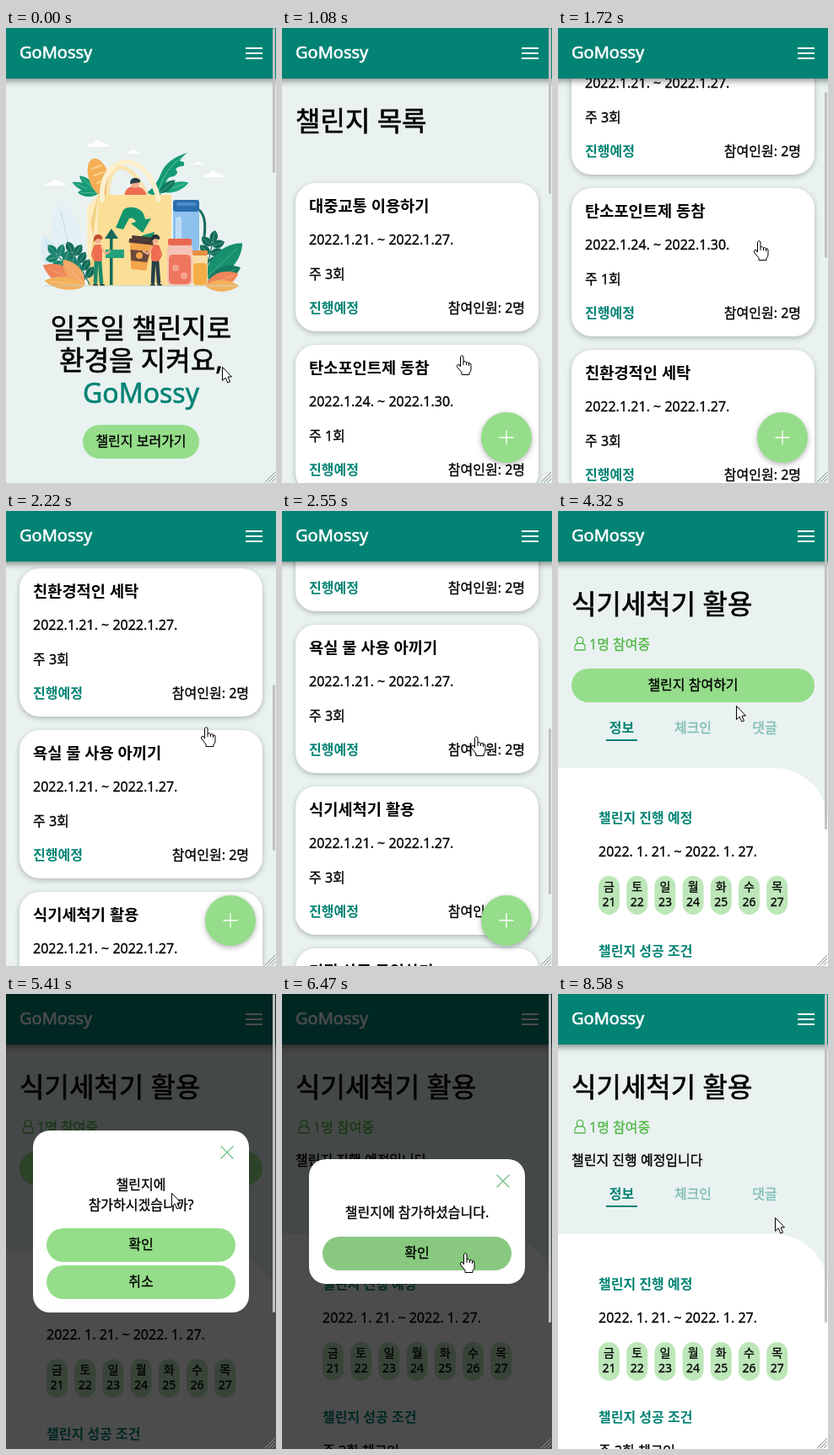
An HTML page for the animation above (8.61 s loop, 320 by 540 pixels).

```html
<!DOCTYPE html>
<html lang="ko">
<head>
<meta charset="utf-8">
<style>
html, body { margin: 0; height: 100%; overflow: hidden; background: #e9f2f1; }
svg { display: block; width: 320px; height: 540px; }
text {
  font-family: "Noto Sans", "Noto Sans CJK KR", "Noto Sans CJK", sans-serif;
  font-size: 16px; white-space: pre; fill: currentColor; stroke: currentColor; stroke-width: .02em;
}
.mid { text-anchor: middle; }
.end { text-anchor: end; }
.big { font-size: 32px; }
.small { font-size: 14px; }
.head { font-size: 18.72px; font-weight: 700; stroke: none; }
.brand { font-size: 20px; color: #fff; stroke-width: .03em; }
.bold { font-weight: 700; stroke: none; }
.teal { color: #028374; fill: #028374; }
.pale { color: #7dbcb4; }
.leafy { color: #55b848; }
.card { fill: #fff; filter: drop-shadow(0 2px 3px rgba(0, 0, 0, .25)); }
.bar { fill: #028374; filter: drop-shadow(0 2px 4px rgba(0, 0, 0, .5)); }
.button { fill: #95dd8a; }
.hover .button { fill: #88c97f; }
.fab { fill: #95dd8a; filter: drop-shadow(0 2px 3px rgba(0, 0, 0, .3)); }
.line { fill: none; stroke-linecap: round; stroke-linejoin: round; }
</style>
</head>
<body>
<svg id="stage" viewBox="0 0 320 540"></svg>
<script>
const LOOP = 8610;
const stage = document.getElementById('stage');

const text = (x, y, s, cls = '') => `<text x="${x}" y="${y}" class="${cls}">${s}</text>`;
const rect = (x, y, w, h, r, attrs) => `<rect x="${x}" y="${y}" width="${w}" height="${h}" rx="${r}" ${attrs}/>`;
const path = (d, fill) => `<path d="${d}" fill="${fill}"/>`;
const line = (d, color, width = 1) => `<path class="line" d="${d}" stroke="${color}" stroke-width="${width}"/>`;
const circle = (x, y, r, fill) => `<circle cx="${x}" cy="${y}" r="${r}" fill="${fill}"/>`;
const group = (id, body) => `<g id="${id}">${body}</g>`;
const button = (id, x, y, w, label) =>
  group(id, rect(x, y, w, 40, 20, 'class="button"') + text(x + w / 2, y + 25, label, 'mid'));

// A pointed leaf growing from (x, y), turned clockwise from upright
const leaf = (x, y, len, wide, turn, fill, vein = '#ffffff55') =>
  `<g transform="translate(${x} ${y}) rotate(${turn})">` +
  path(`M0 0C${-wide} ${-len * .3} ${-wide * .8} ${-len * .75} 0 ${-len}C${wide * .8} ${-len * .75} ${wide} ${-len * .3} 0 0`, fill) +
  line(`M0 0V${-len * .85}`, vein, .8) + '</g>';

const cloud = (x, y, w) => path(`M${x} ${y}q${w * .1} ${-w * .2} ${w * .28} ${-w * .14}q${w * .16} ${-w * .3} ${w * .38} ${-w * .04}q${w * .2} 0 ${w * .34} ${w * .18}z`, '#fff');

function sprig(x, y, turn, fill) {
  let s = line('M0 0V-48', fill, 1.2) + leaf(0, -42, 15, 7, 0, fill);
  for (let i = 0; i < 4; i++) s += leaf(0, -8 - i * 10, 16, 7, 60, fill) + leaf(0, -8 - i * 10, 16, 7, -60, fill);
  return `<g transform="translate(${x} ${y}) rotate(${turn})">${s}</g>`;
}

// A small figure, its near arm reaching towards side (1 right, -1 left)
function person(x, y, side, shirt, pants, hair) {
  return line(`M${x - 2} ${y + 30}L${x - 3} ${y + 56}M${x + 2} ${y + 30}L${x + 4} ${y + 56}`, pants, 4.5) +
    rect(x - 5, y + 11, 10, 20, 3.5, `fill="${shirt}"`) +
    line(`M${x + side * 4} ${y + 14}l${side * 5} 8 ${side * 5}-3`, '#f3b08f', 2.2) +
    line(`M${x - side * 4} ${y + 14}l${-side * 3} 9 ${side * 3} 6`, shirt, 2.4) +
    circle(x, y + 6, 3.8, '#f3b08f') + path(`M${x - 5} ${y + 8}q-1-10 6-9q5 1 4 6l-6-1z`, hair) +
    line(`M${x - 5} ${y + 59}h4M${x + 3} ${y + 59}h4`, '#24343c', 1.8);
}

const art = () =>
  cloud(96, 141, 27) + cloud(143, 149, 16) + cloud(46, 187, 25) + cloud(222, 162, 12) + cloud(234, 177, 25) +
  leaf(84, 300, 98, 26, -13, '#e3f0f6', '#bcd6e5') + leaf(64, 300, 58, 16, -20, '#dcecf5', '#bcd6e5') +
  [[-68, 34], [-48, 31], [-88, 25]].map(([a, l]) => leaf(110, 196, l, 7, a, '#169b76')).join('') +
  `<ellipse cx="110" cy="177" rx="12" ry="23" fill="#f4ae55" transform="rotate(-17 110 177)"/>` +
  line('M102 167l11-4M104 175l12-4M108 184l11-4', '#fbd08d', 2) +
  path('M166 196Q178 188 184 172Q190 156 215 148Q207 154 206 158Q214 158 210 164Q203 164 201 168Q206 172 199 176Q192 176 190 182L182 200z', '#129a74') +
  leaf(184, 194, 34, 8, 72, '#1ca67e') + leaf(182, 196, 24, 7, 50, '#117a60') + line('M180 194Q190 164 208 154', '#5cc5a2', 1) +
  line('M121 200C120 158 145 150 168 200', '#f8e3b0', 5) +
  path('M140 200q1-12 12-12q13 0 15 12z', '#ee6d50') + circle(153, 185, 5, '#f3b08f') + path('M147 185q0-8 7-7q6 1 5 5z', '#274046') +
  path('M109 198H196V306H100z', '#fbdf97') +
  path('M109 198L96 212L97 306H108z', '#fdebbf') + path('M109 198L100 231L117 306H97z', '#f2d082') +
  line('M114 204C110 150 166 138 181 204', '#fcefcd', 6) +
  path('M130 237L139 216Q143 212 152 213Q163 215 165 227L172 226L162 243L148 232L154 230Q151 224 146 226L139 239z', '#14956e') +
  path('M162 246L176 242L173 256L169 254Q162 260 154 258L158 249z', '#14956e') +
  '<g transform="rotate(6 158 270)">' + path('M145 255h27l-4 32h-18z', '#f3a54c') + path('M144 251h29v5h-29zM147 247h23v4h-23z', '#4e3a35') +
  path('M147 264h23l-2 13h-19z', '#68483b') + circle(158, 270, 4, '#f3a54c') + '</g>' +
  path('M117 250L125 238L133 250H126.5V305H123V250z', '#146a5a') + path('M118 263h22v10h-22z', '#25a17b') +
  sprig(99, 304, -28, '#116b59') + sprig(88, 300, -42, '#17816a') +
  leaf(92, 306, 54, 16, -63, '#ef8558') + leaf(93, 306, 40, 13, -39, '#f3a765') + leaf(94, 306, 49, 11, -83, '#f4b15c') +
  person(109, 246, 1, '#ee6d50', '#168a69', '#c3502d') + person(177, 246, -1, '#ee6d50', '#263f46', '#263238') +
  line('M229 216q9 8 6 31', '#146a5a', 3) + rect(198, 210, 31, 58, 5, 'fill="#8fc1ee"') + rect(201, 224, 7, 34, 3, 'fill="#bcdcf6"') +
  rect(198, 204, 31, 14, 3, 'fill="#2c6ead"') + rect(202, 207, 24, 4, 2, 'fill="#4b8bc7"') +
  sprig(236, 296, 12, '#116b59') + leaf(237, 297, 60, 18, 46, '#16906d') + leaf(239, 300, 42, 13, 68, '#117a60') +
  leaf(236, 306, 42, 13, 70, '#ef8558') + leaf(236, 306, 40, 10, 90, '#f4b15c') +
  rect(191, 256, 30, 50, 6, 'fill="#f5c3b5"') + rect(193, 269, 26, 35, 5, 'fill="#ee765f"') + rect(192, 250, 28, 8, 2, 'fill="#e9694f"') +
  circle(201, 285, 4, '#f6a28e') + circle(211, 294, 4, '#f6a28e') +
  rect(221, 268, 18, 38, 5, 'fill="#f9dca6"') + rect(222, 279, 16, 26, 4, 'fill="#f5ad46"') + rect(221, 264, 18, 6, 2, 'fill="#e98d42"') +
  line('M46 306H274', '#b9d0cf', .8);

const home = () => art() +
  text(160, 368, '일주일 챌린지로', 'mid big') + text(160, 406, '환경을 지켜요,', 'mid big') +
  text(160, 445, 'GoMossy', 'mid big teal') + button('go', 91, 471, 138, '챌린지 보러가기');

function card([title, from, to, times, people], i) {
  const y = 184 + i * 192;
  return rect(16, y, 288, 176, 24, 'class="card"') + text(32, y + 34, title, 'head') +
    text(32, y + 73, `2022.1.${from}. ~ 2022.1.${to}.`) + text(32, y + 114, `주 ${times}회`) +
    text(32, y + 154, '진행예정', 'bold teal') + text(288, y + 154, `참여인원: ${people}명`, 'end');
}

const challenges = [
  ['대중교통 이용하기', 21, 27, 3, 2],
  ['탄소포인트제 동참', 24, 30, 1, 2],
  ['친환경적인 세탁', 21, 27, 3, 2],
  ['욕실 물 사용 아끼기', 21, 27, 3, 2],
  ['식기세척기 활용', 21, 27, 3, 1],
  ['리필 상품 구입하기', 21, 27, 1, 1],
];

const list = () =>
  group('scroll', text(16, 122, '챌린지 목록', 'big') + group('cards', challenges.map(card).join(''))) +
  '<circle class="fab" cx="266" cy="486" r="30"/>' + line('M258 486h16M266 478v16', '#fff', 1.3);

const day = (name, i) => {
  const x = 48 + i * 33.2;
  return rect(x, 433, 25, 46, 12.5, 'fill="#bde6b9"') +
    text(x + 12.5, 451, name, 'mid small') + text(x + 12.5, 469, 21 + i, 'mid small');
};

const detail = () =>
  text(16, 122, '식기세척기 활용', 'big') +
  line('M20 165q-1-8 4-8h4q5 0 4 8z', '#55b848', 1.3) + '<circle cx="26" cy="153.500" r="3.800" fill="#e9f2f1" stroke="#55b848" stroke-width="1.300"/>' +
  text(37, 164, '1명 참여중', 'leafy') +
  button('join', 16, 187, 288, '챌린지 참여하기') + group('joined', text(16, 203, '챌린지 진행 예정입니다')) +
  group('body',
    text(75.5, 263, '정보', 'mid bold teal') + rect(57, 271, 37, 2, 0, 'class="teal"') +
    text(160, 263, '체크인', 'mid pale') + text(245, 263, '댓글', 'mid pale') +
    path('M0 305H256A64 64 0 0 1 320 369V600H0z', '#fff') +
    text(48, 370, '챌린지 진행 예정', 'bold teal') + text(48, 410, '2022. 1. 21. ~ 2022. 1. 27.') +
    [...'금토일월화수목'].map(day).join('') +
    text(48, 528, '챌린지 성공 조건', 'bold teal') + text(48, 568, '주 3회 체크인'));

const modal = (id, y, h, body) => group(id, rect(32, y, 256, h, 20, 'fill="#fff"') +
  line(`M255 ${y + 19}l14 14m0-14l-14 14`, '#72c389', 1.4) + body);

const header = '<rect class="bar" x="-10" y="-10" width="340" height="70"/>' + text(16, 36, 'GoMossy', 'brand') +
  [24, 30, 36].map(y => rect(284, y - 1, 20, 2, 0, 'fill="#fff"')).join('');

const cursors =
  group('arrow', '<path d="M.5.5V16.500L4.200 13L6.800 19L9.500 18L7 12H11.500z" fill="#fff" stroke="#000"/>') +
  group('hand', '<path d="M-1.500 14V2Q0-1 2 2V8Q4 6.500 5.500 9Q7.500 7.500 8.500 10Q11 9 11 12V17Q11 20 9 21V23.500H0V21L-5.500 14Q-6 10.500-3 11.500z" fill="#fff" stroke="#000"/><path d="M2 8v4M5.500 9v3M8.500 10v3" stroke="#000"/>');

stage.innerHTML =
  rect(0, 0, 320, 540, 0, 'fill="#e9f2f1"') +
  group('home', home()) + group('list', list()) + group('detail', detail()) + header +
  group('shade', rect(0, 0, 320, 540, 0, 'fill="#000" opacity=".7"')) +
  modal('ask', 162, 216, text(160, 232, '챌린지에', 'mid') + text(160, 256, '참가하시겠습니까?', 'mid') +
    button('yes', 48, 278, 224, '확인') + button('no', 48, 322, 224, '취소')) +
  modal('done', 196, 148, text(160, 265, '챌린지에 참가하셨습니다.', 'mid') + button('ok', 48, 288, 224, '확인')) +
  rect(316, 0, 3, 0, 1.5, 'id="thumb" fill="#c1c1c1"') +
  line('M307 539l12-12M311 539l8-8M315 539l4-4', '#8b8f8f') +
  group('cursor', cursors);

const el = Object.fromEntries([...stage.querySelectorAll('[id]')].map(e => [e.id, e]));
const show = (id, on) => el[id].style.display = on ? '' : 'none';
const hover = (id, on) => el[id].classList.toggle('hover', on);
const move = (id, x, y) => el[id].setAttribute('transform', `translate(${x} ${y})`);

// Linear interpolation through rows of [time, ...values]
function track(rows, t) {
  const i = rows.findIndex(r => r[0] > t);
  if (i < 0) return rows.at(-1).slice(1);
  const a = rows[i - 1], b = rows[i], k = (t - a[0]) / (b[0] - a[0]);
  return a.slice(1).map((v, j) => v + (b[j + 1] - v) * k);
}

const scrollKeys = [[0, 0], [1510, 0], [1720, 185], [2220, 500], [2890, 754], [3260, 832]];
const cursorKeys = [
  [0, 256, 402], [480, 196, 484], [870, 196, 484], [1380, 238, 252], [1720, 238, 252], [2220, 237, 256],
  [2400, 237, 256], [2890, 214, 291], [3260, 139, 227], [3330, 139, 228], [3850, 139, 228], [4290, 211, 231],
  [4320, 211, 231], [4350, 213, 224], [4810, 190, 214], [5320, 190, 214], [5710, 217, 307], [7010, 217, 307],
  [7070, 218, 308], [7270, 218, 308], [7490, 219, 309], [8460, 219, 309], [8580, 257, 265],
];
const handSpans = [[410, 690], [900, 3530], [4350, 5010], [5590, 8020]];

function draw(t) {
  const within = (a, b) => t >= a && t < b;
  const inList = within(690, 3530), inDetail = t >= 3530, joined = t >= 6200;

  show('home', t < 690);
  show('list', inList);
  show('cards', t >= 900);
  show('detail', inDetail);
  show('join', !joined);
  show('joined', joined);
  show('shade', within(5010, 8020));
  el.shade.style.opacity = Math.min(1, (t - 4970) / 120);
  show('ask', within(5010, 6200));
  show('done', within(6200, 8020));
  hover('go', t >= 410);
  hover('join', within(4350, 5010));
  hover('yes', t >= 5590);
  hover('ok', true);

  const [scroll] = track(scrollKeys, t);
  move('scroll', 0, -Math.round(scroll));
  move('body', 0, joined ? -20 : 0);
  el.thumb.setAttribute('y', inList ? Math.round(scroll * .412) : 0);
  el.thumb.setAttribute('height', t < 690 ? 172 : t < 900 ? 0 : inList ? 197 : joined ? 390 : 378);

  const hand = handSpans.some(([a, b]) => within(a, b));
  show('hand', hand);
  show('arrow', !hand);
  move('cursor', ...track(cursorKeys, t).map(Math.round));
}

const start = performance.now();
function tick() {
  draw((performance.now() - start) % LOOP);
  requestAnimationFrame(tick);
}
tick();
</script>
</body>
</html>
```
